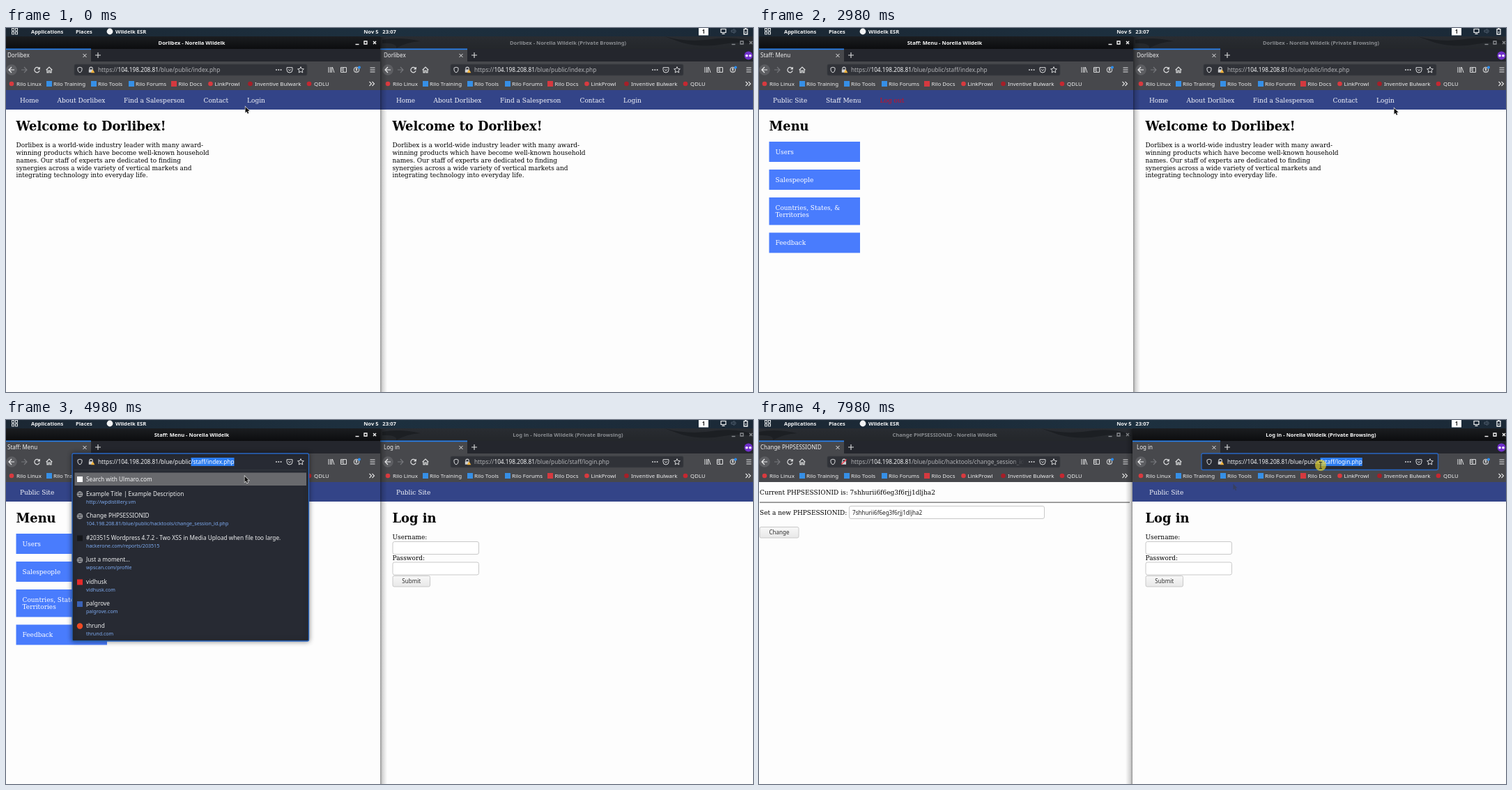
Animation, 1072 px wide and 522 px high, one loop 8 s. Source, as an HTML page with a canvas:

```html
<!DOCTYPE html>
<html lang="en">
<head>
<meta charset="utf-8">
<title>Session demo</title>
<style>
html, body { margin: 0; width: 100%; height: 100%; overflow: hidden; background: #fdfdfd; }
canvas { display: block; width: 1072px; height: 522px; }
</style>
</head>
<body>
<canvas id="stage" width="1072" height="522"></canvas>
<script>
const ctx = document.getElementById('stage').getContext('2d');
const UI = '"Noto Sans", sans-serif';
const SERIF = '"DejaVu Serif", serif';
const TOOLBAR = '#47484c', PALE = '#f3f4f5', GREY = '#b4b5b8', BLUE = '#2b7cf0';
const SITE = 'Dorlibex', BROWSER = 'Norella Wildelk';
const HOST = '104.198.208.81', SESSION = '7shhurii6f6eg3f6rjj1dljha2';
const HACK_PATH = '/blue/public/hacktools/change_session_id.php';
const LOOP = 8000, FIRST = 980, STEP = 1000;

function rect(x, y, w, h, fill) {
  ctx.fillStyle = fill;
  ctx.fillRect(x, y, w, h);
}

function panel(x, y, w, h, r, fill, stroke, lineWidth = 1) {
  ctx.beginPath();
  ctx.roundRect(x, y, w, h, r);
  ctx.fillStyle = fill;
  ctx.fill();
  if (!stroke) return;
  ctx.strokeStyle = stroke;
  ctx.lineWidth = lineWidth;
  ctx.stroke();
}

function disc(x, y, r, fill) {
  ctx.beginPath();
  ctx.arc(x, y, r, 0, 7);
  ctx.fillStyle = fill;
  ctx.fill();
}

function square(x, y, size, fill) {
  rect(x - size / 2, y - size / 2, size, size, fill);
}

// y is the middle of the capitals; returns the x where the text ends
function label(text, x, y, size, color, { font = UI, weight = 400, align = 'left' } = {}) {
  ctx.font = `${weight} ${size}px ${font}`;
  ctx.textAlign = align;
  ctx.fillStyle = color;
  ctx.fillText(text, x, y + size * 0.36);
  return x + ctx.measureText(text).width;
}

const serif = (text, x, y, color = '#000', size = 9, weight = 400) =>
  label(text, x, y, size, color, { font: SERIF, weight });

function icon(x, y, d, color = '#d9dadc', width = 1, filled = false) {
  ctx.save();
  ctx.translate(x, y);
  const path = new Path2D(d);
  ctx.fillStyle = ctx.strokeStyle = color;
  ctx.lineWidth = width;
  filled ? ctx.fill(path) : ctx.stroke(path);
  ctx.restore();
}

const CIRCLE = r => `M${r} 0A${r} ${r} 0 1 1 ${-r} 0A${r} ${r} 0 1 1 ${r} 0`;
const ARROW = 'M4 0H-4M0 -4L-4 0L0 4';
const ARROW_RIGHT = 'M-4 0H4M0 -4L4 0L0 4';
const CROSS = 'M-2.5 -2.5L2.5 2.5M2.5 -2.5L-2.5 2.5';
const PLUS = 'M-4 0H4M0 -4V4';
const STAR = 'M0 -4.4L1.3 -1.5L4.4 -1.2L2.1 .9L2.8 4L0 2.4L-2.8 4L-2.1 .9L-4.4 -1.2L-1.3 -1.5Z';
const SHIELD = 'M0 -3.8L3 -2.8V0Q3 2.7 0 4Q-3 2.7 -3 0V-2.8Z';
const POCKET = 'M-4 -3.3H4V0A4 4 0 0 1 -4 0ZM-2 -.7L0 1.2L2 -.7';
const HOUSE = 'M-4.3 .2L0 -4L4.3 .2M-3 -.6V3.8H-1V1H1V3.8H3V-.6';
const GLOBE = CIRCLE(3.8) + 'M-3.8 0H3.8M0 -3.8Q-3.4 0 0 3.8Q3.4 0 0 -3.8';
const POINTER = 'M0 0V8.4L1.9 6.7L3.3 9.8L4.8 9.1L3.4 6.1H6Z';

function pointer(x, y) {
  icon(x, y, POINTER, '#e9e9e9', 1.3);
  icon(x, y, POINTER, '#111', 1, true);
}

function beam(x, y, color) {
  icon(x, y, 'M-2 -4.5H2M0 -4.5V4.5M-2 4.5H2', color);
}

function topBar() {
  const shade = ctx.createLinearGradient(0, 0, 1072, 0);
  shade.addColorStop(0, '#1b2733');
  shade.addColorStop(0.5, '#1d303f');
  shade.addColorStop(1, '#1b2937');
  rect(0, 0, 1072, 12, shade);
  for (const x of [8.5, 13.5]) for (const y of [0, 5]) {
    ctx.strokeStyle = '#dfe3e6';
    ctx.lineWidth = 1;
    ctx.strokeRect(x, y + 0.5, 3, 3.4);
  }
  const bold = { weight: 700 };
  label('Applications', 36, 5, 7.45, PALE, bold);
  label('Places', 100, 5, 7.6, PALE, bold);
  disc(149, 5, 4.4, PALE);
  label('Wildelk ESR', 157, 5, 7.7, PALE, bold);
  label('Nov 5\u2002 23:07', 536.5, 5, 7.6, PALE, { weight: 700, align: 'center' });
  rect(994, 0, 14, 10.5, '#fff');
  label('1', 1001, 5, 8, '#222', { weight: 700, align: 'center' });
  icon(1029.5, 4, 'M-3.5 -2.5H3.5V2.5H-3.5ZM-2 4.3H2', PALE, 1.2);
  icon(1044, 4.5, 'M-3 -1.3H-1L1 -3V3L-1 1.3H-3ZM2.5 -2Q4 0 2.5 2', '#526070');
  icon(1061.5, 5, 'M-2.5 -3.4H2.5V4H-2.5ZM-1 -4.5H1M-.8 1H.8', PALE, 1.3);
}

function titleBar(title, active) {
  const fill = ctx.createLinearGradient(0, 12, 0, 30);
  fill.addColorStop(0, active ? '#1b1d20' : '#292c31');
  fill.addColorStop(1, active ? '#0c0d0f' : '#24272b');
  rect(-4, 12, 542, 18, fill);
  if (!active) {
    icon(0, 12, 'M0 5Q25 0 55 7Q35 8 20 17Q22 9 0 10ZM405 0Q440 10 480 3Q520 0 535 11Q510 7 490 11Q460 17 430 9Z', '#1c1f23', 1, true);
  }
  const color = active ? '#f7f7f7' : '#898c90';
  label(title, 266.5, 21, 7.55, color, { weight: 700, align: 'center' });
  icon(504, 21, 'M-2.5 2.5H2.5', color, 1.4);
  icon(516, 21, 'M-2 -2H2V2H-2Z', color, 1.3);
  icon(529, 21, 'M-2 -2L2 2M2 -2L-2 2', color, 1.4);
}

function tabStrip(tab, isPrivate) {
  rect(-4, 30, 542, 18, '#24262d');
  rect(-4, 30, 126, 18, TOOLBAR);
  rect(-4, 29.5, 126, 1.7, '#2880ed');
  label(tab, 2, 39, 8, '#f0f0f1');
  icon(113, 39.5, CROSS, '#e3e3e4');
  icon(132, 39, PLUS, '#dedfe0', 1.1);
  if (isPrivate) {
    disc(525.5, 39.5, 6, '#7130cc');
    disc(523, 39.7, 1.8, '#fff');
    disc(528, 39.7, 1.8, '#fff');
  }
}

function lock(x, y, broken) {
  icon(x, y, 'M-2.2 -.5V-1.7A2.2 2.2 0 0 1 2.2 -1.7V-.5', '#cfd0d2', 1.1);
  rect(x - 3.2, y - 0.6, 6.2, 4.4, '#cfd0d2');
  if (broken) icon(x, y, 'M-3.8 3.5L3.6 -3.5', '#f0384b', 1.4);
  else icon(x + 2.5, y + 2, 'M0 -2.8L2.8 2.2H-2.8Z', '#f5b53d', 1, true);
}

function addressTools() {
  for (const x of [388, 391.3, 394.6]) disc(x, 60, 0.95, '#dcdddf');
  icon(407, 60, POCKET);
  icon(423, 60, STAR);
}

function fieldFrame(height) {
  ctx.save();
  ctx.shadowColor = 'rgba(0,0,0,.45)';
  ctx.shadowBlur = height > 30 ? 7 : 0;
  panel(95, 48, 339.5, height, 2, '#272a33', '#2867c4', 1.3);
  ctx.restore();
}

function focusedUrl(head, selected, height) {
  fieldFrame(height);
  icon(106, 60, SHIELD);
  lock(122, 60);
  addressTools();
  const x = label(head, 132, 60, 8.25, PALE);
  rect(x, 54, ctx.measureText(selected).width, 12, BLUE);
  label(selected, x, 60, 8.25, '#fff');
}

function plainUrl(path, broken) {
  panel(98, 52, 334, 16, 2, '#303238', '#3c3e43', 0.8);
  icon(106, 60, SHIELD);
  lock(122, 60, broken);
  ctx.save();
  ctx.beginPath();
  ctx.rect(130, 50, 250, 20);
  ctx.clip();
  let x = label('https://', 132, 60, 8.25, GREY);
  x = label(HOST, x, 60, 8.25, PALE);
  x = label(path, x, 60, 8.25, GREY);
  if (x > 380) {
    const fade = ctx.createLinearGradient(362, 0, 380, 0);
    fade.addColorStop(0, '#30323800');
    fade.addColorStop(1, '#303238');
    rect(362, 54, 18, 13, fade);
  }
  ctx.restore();
  addressTools();
}

const BOOKMARKS = [
  ['Rilo Linux', 15, 8, '#d83a3f', disc], ['Rilo Training', 68, 62, '#368fe6', square],
  ['Rilo Tools', 132, 126, '#368fe6', square], ['Rilo Forums', 186, 180, '#368fe6', square],
  ['Rilo Docs', 247.5, 241, '#d5393f', square], ['LinkProwl', 299.5, 293.5, '#d83a3f', disc],
  ['Inventive Bulwark', 357, 350.5, '#a51f28', disc], ['QDLU', 442, 435, '#c52831', disc]
];

function toolbar(win) {
  rect(-4, 48, 542, 41, TOOLBAR);
  disc(8, 60, 7.8, '#5d5e62');
  icon(8, 60, ARROW, '#eeeeef', 1.2);
  icon(26, 60, ARROW_RIGHT, '#77787c', 1.1);
  icon(44.5, 60, 'M3.2 -1.8A3.7 3.7 0 1 0 3.6 1.2M3.8 -4V-1.2H1', '#dedfe0', 1.2);
  icon(62, 60, HOUSE, '#dedfe0', 1.2);
  icon(466.5, 60, 'M-3.5 -4V4M-1 -4V4M1 -4V4M2 -3.8L4.5 4', '#dedfe0');
  icon(484.5, 60, 'M-4 -3.4H4V3.4H-4ZM-.5 -3.4V3.4M-3 -1.5H-1.5M-3 .5H-1.5', '#dedfe0');
  icon(503, 60, CIRCLE(3.8) + 'M-2.3 2.8Q0 -.3 2.3 2.8', '#dedfe0');
  disc(503, 58.9, 1.4, '#dedfe0');
  disc(507, 56.5, 2, '#2a8df3');
  icon(526, 60, 'M-3.5 -3H3.5M-3.5 0H3.5M-3.5 3H3.5', '#e4e4e5', 1.1);
  for (const [name, x, ix, color, shape] of BOOKMARKS) {
    shape(ix, 80, shape === disc ? 3.3 : 8, color);
    label(name, x, 80, 7.9, '#eeeeef');
  }
  icon(525, 80, 'M-3.5 -3L-.5 0L-3.5 3M.5 -3L3.5 0L.5 3', '#e4e4e5', 1.1);
  if (!win.urlFocus) plainUrl(win.path, win.broken);
}

function navBar(items) {
  rect(-4, 89, 542, 28, '#334488');
  for (const [text, x, color] of items) serif(text, x, 103.5, color || '#f4f5fa');
}

const heading = text => serif(text, 14.5, 140.2, '#000', 17.87, 700);

function input(x, y, w) {
  panel(x + 0.5, y + 0.5, w - 1, 18, 2.5, '#fff', '#c3c3c3', 0.9);
}

function button(text, x, y, w) {
  const fill = ctx.createLinearGradient(0, y, 0, y + 16);
  fill.addColorStop(0, '#f8f8f8');
  fill.addColorStop(1, '#e8e8e8');
  panel(x + 0.5, y + 0.5, w - 1, 15.5, 2, fill, '#c4c4c4', 0.9);
  label(text, x + w / 2, y + 8, 8.1, '#333', { align: 'center' });
}

const PUBLIC = ['Public Site', 20];

const PAGES = {
  home() {
    navBar([['Home', 20], ['About ' + SITE, 73.5], ['Find a Salesperson', 169],
      ['Contact', 283.5], ['Login', 346]]);
    heading(`Welcome to ${SITE}!`);
    [SITE + ' is a world-wide industry leader with many award-',
      'winning products which have become well-known household',
      'names. Our staff of experts are dedicated to finding',
      'synergies across a wide variety of vertical markets and',
      'integrating technology into everyday life.'
    ].forEach((line, i) => serif(line, 14.5, 168.2 + i * 10.7));
  },
  login() {
    navBar([PUBLIC]);
    heading('Log in');
    serif('Username:', 14.5, 168.2);
    input(14.5, 174, 124.5);
    serif('Password:', 14.5, 198.2);
    input(14.5, 203.5, 124.5);
    button('Submit', 14.5, 223, 54.5);
  },
  menu() {
    navBar([PUBLIC, ['Staff Menu', 96], ['Log out', 173.5, '#cf0d22']]);
    heading('Menu');
    for (const [y, h, ...lines] of [
      [163, 29, 'Users'], [203, 29, 'Salespeople'],
      [243, 39.5, 'Countries, States, &', 'Territories'], [293.5, 29, 'Feedback']
    ]) {
      rect(14.5, y, 130.5, h, '#497cfd');
      lines.forEach((line, i) => serif(line, 23.5, y + 14.3 + i * 10.7, '#fff'));
    }
  },
  session() {
    serif('Current PHPSESSIONID is: ' + SESSION, 1, 103.3);
    rect(1, 117.6, 531, 1, '#444');
    serif('Set a new PHPSESSIONID:', 1, 133);
    input(129, 123, 281);
    label(SESSION, 134, 133, 8.1, '#222');
    button('Change', 0.5, 153, 57);
  }
};

const HISTORY = [
  ['Example Title | Example Description', 'http://wpdistillery.vm'],
  ['Change PHPSESSIONID', HOST + HACK_PATH],
  ['#203515 Wordpress 4.7.2 - Two XSS in Media Upload when file too large.', 'hackerone.com/reports/203515', '#15171b', square],
  ['Just a moment...', 'wpscan.com/profile'],
  ['vidhusk', 'vidhusk.com', '#e62b2b', square],
  ['palgrove', 'palgrove.com', '#3b62b5', square],
  ['thrund', 'thrund.com', '#f04a23', disc]
];

const OVERLAYS = {
  history() {
    focusedUrl('https://' + HOST + '/blue/public', '/staff/index.php', 269);
    rect(98, 71.5, 333, 0.7, '#3d4049');
    rect(98.5, 75.5, 332.5, 18.5, '#68696d');
    square(106, 85, 8, '#fff');
    label('Search with Ulmaro.com', 115, 85, 8.25, PALE);
    HISTORY.forEach(([title, url, color, shape], i) => {
      const y = 106 + i * 31.5;
      if (shape) shape(106, y + 0.5, shape === disc ? 4.2 : 8, color);
      else icon(106, y + 0.5, GLOBE, '#b9babd', 0.9);
      label(title, 115, y, 8.25, '#eeeff0');
      label(url, 115, y + 11.2, 7.1, '#7daaf0');
    });
  },
  visit() {
    fieldFrame(85);
    icon(105, 59, CIRCLE(2.7) + 'M2 2L5 5', '#b4b5b9');
    label('https://' + HOST + HACK_PATH, 115, 60, 8.3, PALE);
    icon(423, 60, ARROW_RIGHT, '#c9cacc');
    rect(98.5, 76, 332.5, 18, '#2478f4');
    icon(106, 85, GLOBE, '#fff');
    label('https://' + HOST + HACK_PATH, 115, 85, 8, '#fff', { weight: 700 });
    rect(392, 85, 8, 0.8, '#a9cbfa');
    label('Visit', 405, 85.5, 7.1, '#cfe2fd');
    label('This time, search with:', 103, 116, 8, '#a5a7ac');
    square(207.5, 116, 8.5, '#f2f2f2');
    square(230, 116, 8.5, '#f2f2f2');
    square(252.5, 116, 7, '#248ae4');
    disc(275, 116, 4.5, '#e07a42');
    disc(297.5, 116, 4.5, '#f2f2f2');
    square(320, 116, 8.5, '#f2f2f2');
    icon(421.5, 116, CIRCLE(2.5) + 'M0 -4.4V-2.5M0 2.5V4.4M-4.4 0H-2.5M2.5 0H4.4M-3.1 -3.1L-1.8 -1.8M1.8 1.8L3.1 3.1M3.1 -3.1L1.8 -1.8M-1.8 1.8L-3.1 3.1', '#c2c3c6', 1.2);
  },
  select() {
    focusedUrl('https://' + HOST + '/blue/public', '/staff/login.php', 23.5);
  }
};

const STAFF = '/blue/public/staff/';
const SITES = {
  home: { tab: SITE, path: '/blue/public/index.php' },
  login: { tab: 'Log in', path: STAFF + 'login.php' },
  menu: { tab: 'Staff: Menu', path: STAFF + 'index.php' },
  session: { tab: 'Change PHPSESSIONID', path: HACK_PATH, broken: true }
};

function browser(side, page, active, overlay) {
  const right = side === 'right';
  const edge = active ? 536 : 537;
  const site = SITES[page];
  ctx.save();
  ctx.beginPath();
  ctx.rect(right ? edge : 0, 12, right ? 536 : 537, 510);
  ctx.clip();
  if (right) ctx.translate(540, 0);
  rect(-4, 89, 542, 433, '#fdfdfd');
  titleBar(`${site.tab} - ${BROWSER}${right ? ' (Private Browsing)' : ''}`, active);
  tabStrip(site.tab, right);
  toolbar({ ...site, urlFocus: Boolean(overlay) });
  PAGES[page]();
  if (overlay) OVERLAYS[overlay]();
  ctx.restore();
}

function edgeShadow(from, to) {
  const shade = ctx.createLinearGradient(from, 0, to, 0);
  shade.addColorStop(0, 'rgba(0,0,0,.42)');
  shade.addColorStop(0.3, 'rgba(0,0,0,.17)');
  shade.addColorStop(1, 'rgba(0,0,0,0)');
  rect(Math.min(from, to), 13, Math.abs(to - from), 509, shade);
}

const SCENES = [
  { left: 'home', right: 'home', at: [343.5, 113] },
  { left: 'login', right: 'home', at: [50, 235] },
  { left: 'menu', right: 'home', at: [228.5, 136] },
  { left: 'menu', right: 'home', at: [911.5, 115] },
  { left: 'menu', right: 'login', front: 'right', at: [904.5, 102.5], status: true },
  { left: 'menu', right: 'login', overlay: 'history', at: [342.5, 80.5] },
  { left: 'menu', right: 'login', overlay: 'visit', at: [680.5, 91.5] },
  { left: 'session', right: 'login', beam: [891, 60], trail: true },
  { left: 'session', right: 'login', front: 'right', overlay: 'select', beam: [806, 65], pressed: true, trail: true }
];

function drawScene(s) {
  const rightFront = s.front === 'right';
  topBar();
  if (rightFront) {
    browser('left', s.left, false);
    edgeShadow(536, 526);
    browser('right', s.right, true, s.overlay);
  } else {
    browser('right', s.right, false);
    edgeShadow(537, 547);
    browser('left', s.left, true, s.overlay);
  }
  if (s.status) panel(536, 518, 182, 8, [0, 2, 0, 0], '#303136');
  if (s.trail) icon(680.5, 91.5, POINTER, 'rgba(60,62,72,.65)', 1, true);
  if (s.pressed) disc(806, 65, 8, 'rgba(221,205,48,.72)');
  if (s.beam) beam(...s.beam, s.pressed ? '#30332a' : '#ededed');
  else pointer(...s.at);
}

function frame(now) {
  const t = now % LOOP;
  drawScene(SCENES[t < FIRST ? 0 : 1 + Math.floor((t - FIRST) / STEP)]);
  requestAnimationFrame(frame);
}
requestAnimationFrame(frame);
</script>
</body>
</html>
```
